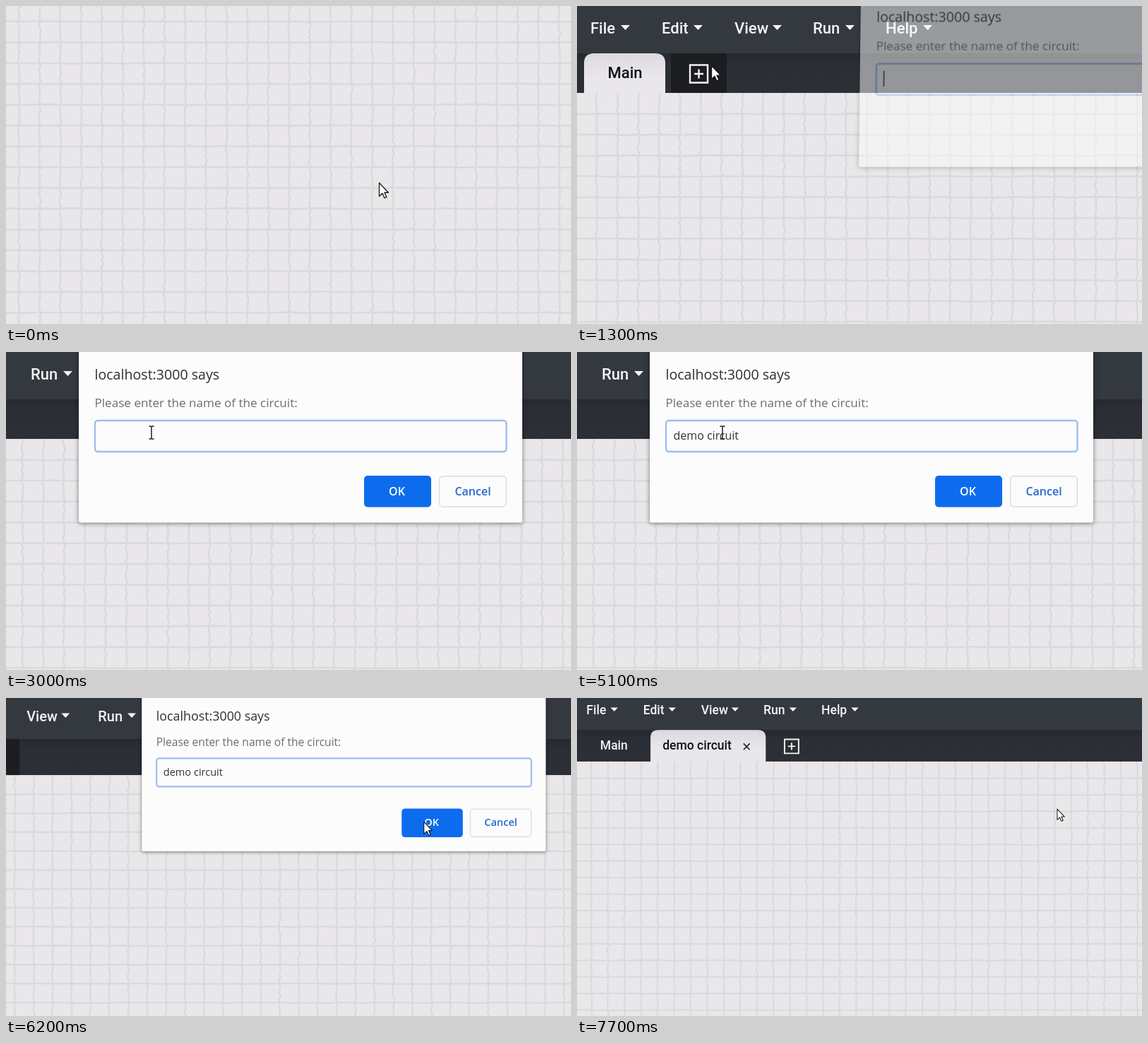
Recreate the animation shown at these times as an HTML page. Size 800x450 px, loop 7.8 s.

```html
<!DOCTYPE html>
<html lang="en">
<head>
<meta charset="utf-8">
<title>New circuit</title>
<style>
  html, body { margin: 0; width: 100%; height: 100%; overflow: hidden; background: #e9e7ea; }
  #stage { position: relative; width: 800px; height: 450px; overflow: hidden; }
  #world { position: absolute; left: 0; top: 0; width: 1500px; height: 820px; transform-origin: 0 0; }
  svg { position: absolute; left: 0; top: 0; overflow: visible; }
  text { white-space: pre; }
  #bar text { font: 500 22px Roboto, sans-serif; fill: #f4f4f5; }
  #bar .on text { fill: #121214; }
  #dialog { font: 16px "Open Sans", "Noto Sans", sans-serif; transform-origin: 716px 0; }
  #dialog .btn { font-weight: 600; text-anchor: middle; }
  #panel { filter: drop-shadow(0 1px 3px rgba(0, 0, 0, .5)); }
</style>
</head>
<body>
<div id="stage">
  <div id="world">
    <svg width="1500" height="820">
      <g fill="none" stroke="#dad9dc">
        <path id="rows" stroke-width="2.6"/>
        <path id="cols" stroke-width="2.4"/>
      </g>
      <g id="bar">
        <defs>
          <linearGradient id="strip" x2="0" y2="1">
            <stop stop-color="#262a2f"/>
            <stop offset=".3" stop-color="#2b2f35"/>
            <stop offset="1" stop-color="#2c3036"/>
          </linearGradient>
          <linearGradient id="tab" x2="0" y2="1">
            <stop stop-color="#dcdade"/>
            <stop offset=".6" stop-color="#e9e7ea"/>
          </linearGradient>
        </defs>
        <rect x="-20" y="-20" width="1540" height="88" fill="#343940"/>
        <rect x="-20" y="67" width="1540" height="56" fill="url(#strip)"/>
        <g id="menu"></g>
        <g id="main">
          <path d="M10 123V81q0-14 14-14h87q14 0 14 14v42z" fill="url(#tab)"/>
          <text x="43.5" y="102">Main</text>
        </g>
        <g id="demo" class="on">
          <path d="M133 123V81q0-14 14-14h177q14 0 14 14v42z" fill="url(#tab)"/>
          <text x="154.500" y="102">demo circuit</text>
          <path d="M298.500 91l11 11m0-11l-11 11" stroke="#1c1c1e" stroke-width="2"/>
        </g>
        <rect id="pressed" x="133" y="67" width="79" height="56" fill="#1b1d21"/>
        <path id="plus" d="M160 83.500h25v25h-25zM172.500 89.500v13M166 96h13" fill="none" stroke="#f4f4f5" stroke-width="2.4"/>
      </g>
    </svg>

    <svg id="dialog" width="1500" height="820">
      <rect id="panel" x="402" y="-40" width="628" height="281.500" rx="3" fill="#fdfcfd"/>
      <text x="424.500" y="38.500" font-size="19.6" fill="#2f3033">localhost:3000 says</text>
      <text x="424.500" y="78" font-size="17.1" fill="#6b6d70">Please enter the name of the circuit:</text>
      <rect id="field" x="425" y="97" width="582.500" height="44" rx="4" fill="#fdfcfd"/>
      <text id="typed" x="435.500" y="124" fill="#333"></text>
      <rect id="caret" y="107" width="1.500" height="22" fill="#222"/>
      <rect x="806" y="175" width="95" height="44.500" rx="5" fill="#0d6cee"/>
      <text class="btn" x="852.500" y="202.500" fill="#fff">OK</text>
      <rect x="912.700" y="175.700" width="94.600" height="43.300" rx="5" fill="#fdfcfd" stroke="#dadce0" stroke-width="1.4"/>
      <text class="btn" x="960" y="202.500" fill="#2467cf">Cancel</text>
    </svg>

    <svg id="cursor" width="20" height="24">
      <path id="arrow" d="M.5.5V19.500L5 15.300L7.900 21.900L10.900 20.600L8 14.200H13.500Z" fill="#fff" stroke="#17181a" stroke-width="1.3" stroke-linejoin="round"/>
      <path id="beam" d="M-3.500-9h2.500l1 1 1-1h2.500M0-8v16M-3.500 9h2.500l1-1 1 1h2.500" fill="none" stroke="#222" stroke-width="1.5"/>
    </svg>
  </div>
</div>

<script>
const $ = id => document.getElementById(id);
const LOOP = 7800, STEP = 100, CELL = 29.43;
const NAME = "demo circuit", TYPE_START = 3400, SWITCH = 7200;

// Slightly rough hand-drawn grid
let seed = 7;
const rand = () => (seed = seed * 16807 % 2147483647) / 2147483647;
let rows = "", cols = "";
for (let y = 152.8; y < 820; y += CELL) {
  rows += `M-20 ${y}`;
  for (let x = -10; x < 1500; x += 18) rows += `L${x} ${(y + rand() - .5).toFixed(1)}`;
}
for (let x = 28 - CELL; x < 1500; x += CELL) {
  cols += `M${x} 120`;
  for (let y = 123; y < 820; y += 3) cols += `L${(x + (rand() - .5) * 2.6).toFixed(1)} ${y}`;
}
$("rows").setAttribute("d", rows);
$("cols").setAttribute("d", cols);

// label, text x, arrow x
$("menu").innerHTML = [["File", 19, 62], ["Edit", 120, 165], ["View", 223, 277], ["Run", 334, 380], ["Help", 437, 490]]
  .map(([label, x, ax]) => `<text x="${x}" y="39">${label}</text><path d="M${ax} 27h13l-6.500 7z" fill="#f4f4f5"/>`)
  .join("");

// Monotone cubic curve through [time, value] keys, flat at both ends
function track(...keys) {
  const slope = i => (keys[i + 1][1] - keys[i][1]) / (keys[i + 1][0] - keys[i][0]);
  const tangent = keys.map((_, i) => {
    if (!i || i === keys.length - 1) return 0;
    const a = slope(i - 1), b = slope(i);
    return a * b > 0 ? 2 * a * b / (a + b) : 0;
  });
  return t => {
    if (t <= keys[0][0]) return keys[0][1];
    const i = keys.findIndex(k => k[0] > t) - 1;
    if (i < 0) return keys[keys.length - 1][1];
    const [t0, v0] = keys[i], [t1, v1] = keys[i + 1];
    const d = t1 - t0, u = (t - t0) / d, w = 1 - u;
    return v0 * w * w * (1 + 2 * u) + v1 * u * u * (3 - 2 * u)
      + d * u * w * (tangent[i] * w - tangent[i + 1] * u);
  };
}

const zoom = track([5400, 1], [6200, .911], [7000, .832], [7700, .796], [7800, .795]);
const panX = track([150, 304], [1050, 0], [1500, 0], [2500, 299], [5400, 299], [6200, 174], [7000, 51.7], [7700, 1.8], [7800, 1]);
const panY = track([150, 160.2], [1050, 0], [5400, 0], [6200, 3], [7000, 6], [7700, 8]);
const mouseX = track([150, 832], [1050, 190], [1400, 190], [2400, 505], [5200, 505], [6200, 840], [7000, 859], [7700, 856]);
const mouseY = track([150, 410], [1050, 84], [1400, 84], [2400, 114], [5200, 114], [6200, 195], [7000, 199.5], [7700, 207]);
const fade = track([1200, 0], [1300, .5], [1500, 1], [6900, 1], [7000, .88], [7200, 0]);
const lift = track([1200, -20], [1300, -15.5], [1500, 0], [6900, 0], [7000, -10], [7200, -20]);

const show = (id, on) => $(id).style.display = on ? "" : "none";

function draw(t) {
  $("world").style.transform = `translate(${-panX(t)}px, ${-panY(t)}px) scale(${zoom(t)})`;

  const added = t >= SWITCH;
  $("main").setAttribute("class", added ? "" : "on");
  $("main").firstElementChild.style.display = added ? "none" : "";
  show("demo", added);
  show("pressed", t >= 1000 && !added);
  $("plus").setAttribute("transform", `translate(${added ? 211.5 : 0})`);

  const alpha = fade(t), dy = lift(t);
  const tilt = 3.4 * Math.min(1, -dy / 11);
  show("dialog", alpha > 0);
  $("dialog").style.opacity = alpha;
  $("dialog").style.transform = dy ? `perspective(1500px) translateY(${dy}px) rotateX(${tilt}deg)` : "none";

  const focused = t < 6900;
  $("field").setAttribute("stroke", focused ? "#9dbdec" : "#d3d3d6");
  $("field").setAttribute("stroke-width", focused ? 2.4 : 1.4);
  const count = Math.max(0, Math.min(NAME.length, Math.floor((t - TYPE_START) / STEP) + 1));
  $("typed").textContent = NAME.slice(0, count);
  const typing = count > 0 && count < NAME.length;
  const blinkFrom = count ? TYPE_START + (NAME.length - 1) * STEP : 1250;
  show("caret", focused && (typing || (t - blinkFrom) % 1000 < 500));
  if (alpha > 0) $("caret").setAttribute("x", 435 + (count && $("typed").getComputedTextLength() + 1));

  const x = mouseX(t), y = mouseY(t);
  const overField = alpha > 0 && x > 425 && x < 1008 && y > 96 && y < 141;
  $("cursor").style.transform = `translate(${x}px, ${y}px)`;
  show("arrow", !overField);
  show("beam", overField);
}

function tick() {
  draw(Math.floor(performance.now() % LOOP / STEP) * STEP);
  requestAnimationFrame(tick);
}
tick();
</script>
</body>
</html>
```
